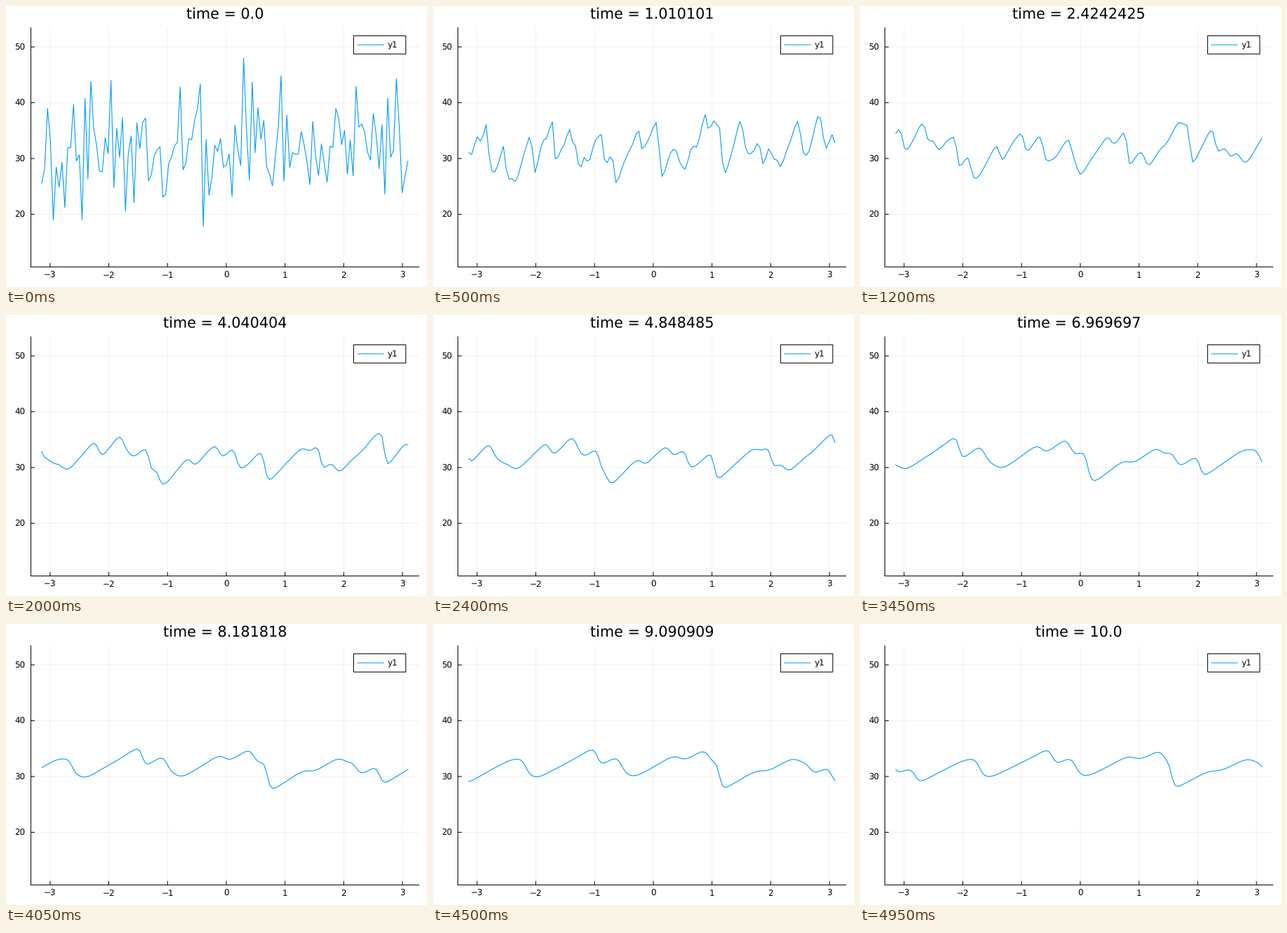
Write a matplotlib script that moves like this. It is 600 px wide and 400 px high and loops after 5 s.

```python
import numpy as np
import matplotlib.pyplot as plt
from matplotlib.animation import FuncAnimation
from matplotlib.patches import Rectangle

W, H, DPI = 600, 400, 100
FRAMES, INTERVAL = 100, 50
PX = 72 / DPI  # points per pixel
LEFT, RIGHT, TOP, BOTTOM = 35.45, 588.4, 31, 371.45
BLUE = "#009afa"

# Burgers' equation u_t + C u u_x = NU u_xx on a periodic domain
C, NU = 1 / 64, 0.001
N, FINE = 128, 2048

# Local levels of the noisy start; they decide where the shocks form
LEVELS = [31.5, 25.4, 31.2, 30.0, 34.5, 30.0, 33.6, 30.7,
          31.7, 30.2, 27.6, 31.1, 33.4, 38.1, 25.3, 31.4,
          29.7, 35.9, 35.0, 31.5, 33.9, 30.8, 32.2, 30.4,
          28.6, 35.1, 32.0, 35.4, 33.4, 30.5, 36.7, 29.0]


def noisy_start():
    """White noise whose local averages follow LEVELS."""
    noise = np.random.default_rng(4).normal(0, 5.8, (len(LEVELS), N // len(LEVELS)))
    noise -= noise.mean(axis=1, keepdims=True)
    return (np.array(LEVELS)[:, None] + noise).ravel()


START = noisy_start()
MEAN = START.mean()
grid = -np.pi + 2 * np.pi * np.arange(N) / N
times = np.arange(FRAMES, dtype=np.float32) * np.float32(10 / (FRAMES - 1))


def heat_modes():
    """Fourier modes of the Cole-Hopf potential at time zero."""
    modes = np.fft.rfft(C * (START - MEAN))
    modes[0] = 0
    modes[-1] /= 2
    k = np.arange(len(modes))
    k[0] = 1
    theta = np.fft.irfft(modes / (1j * k), FINE) * FINE / N
    return np.fft.rfft(np.exp(-(theta - theta.mean()) / (2 * NU)))


K = np.arange(FINE // 2 + 1)
PHI0 = heat_modes()


def solve(t):
    if t == 0:
        return START
    phi = PHI0 * np.exp(-NU * K**2 * t - 1j * K * C * MEAN * t)
    slope = np.fft.irfft(1j * K * phi, FINE)
    u = MEAN - 2 * NU / C * slope / np.fft.irfft(phi, FINE)
    return u[::FINE // N]


def to_x(x):
    return 313.95 + 83.7 * x


def to_y(u):
    return 217.1 - 7.945 * (u - 30)


plt.rcParams.update({"font.family": "DejaVu Sans", "text.hinting": "none"})
fig = plt.figure(figsize=(W / DPI, H / DPI), dpi=DPI, facecolor="white")
ax = fig.add_axes([0, 0, 1, 1])
ax.set_xlim(0, W)
ax.set_ylim(H, 0)
ax.axis("off")


def stroke(xs, ys, color="black", width=1.0, **kw):
    return ax.plot(xs, ys, color=color, lw=width * PX, snap=False, **kw)[0]


def label(x, y, text, size=11.9, **kw):
    return ax.text(x, y, text, fontsize=size * PX, color="black", va="baseline", **kw)


for v in range(-3, 4):
    x = to_x(v)
    stroke([x, x], [TOP, BOTTOM], alpha=0.06, zorder=1)
    stroke([x, x], [BOTTOM, BOTTOM - 5], zorder=3)
    label(x, 387, str(v).replace("-", "\u2212"), ha="center")

for v in range(20, 51, 10):
    y = to_y(v)
    stroke([LEFT, RIGHT], [y, y], alpha=0.06, zorder=1)
    stroke([LEFT, LEFT + 5], [y, y], zorder=3)
    label(27.7, y + 4.4, str(v), ha="right")

stroke([LEFT, LEFT], [TOP, BOTTOM], zorder=3)
stroke([LEFT, RIGHT], [BOTTOM, BOTTOM], zorder=3)

curve = stroke(to_x(grid), to_y(START), BLUE, 1.1, zorder=2)

ax.add_patch(Rectangle((495.4, 42.4), 74.4, 25.9, fc="white", ec="black",
                       lw=PX, snap=False, zorder=4))
stroke([501, 538], [55.3, 55.3], BLUE, zorder=5)
label(544, 59.5, "y1", ha="left", zorder=5)

title = label(312, 18.6, "", 20.8, ha="center")


def update(i):
    curve.set_ydata(to_y(solve(float(times[i]))))
    title.set_text(f"time = {times[i]!s}")
    return curve, title


anim = FuncAnimation(fig, update, frames=FRAMES, interval=INTERVAL,
                     repeat=True, repeat_delay=0, blit=False)
plt.show()
```
